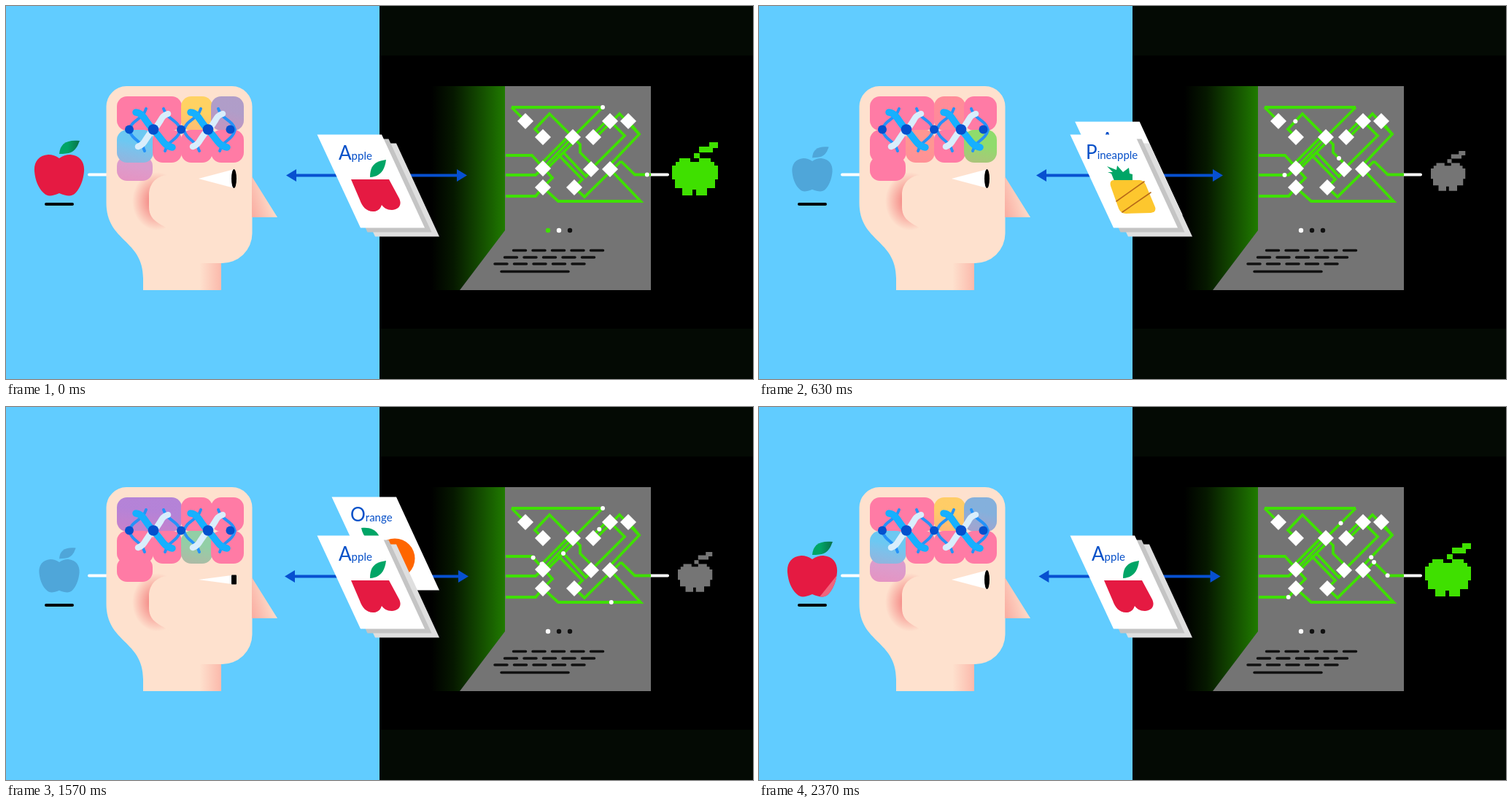
An HTML page that plays this animation: 1024x512 px, repeating every 2.41 s.

```html
<!DOCTYPE html>
<html lang="en">
<head>
<meta charset="utf-8">
<title>Human and machine vision</title>
<style>
html, body { margin: 0; height: 100%; overflow: hidden; background: #000; }
svg { display: block; width: 100vw; height: 100vh; }
text { font: 15px Lato, "Open Sans", sans-serif; fill: #0750c8; }
.cap { font-size: 26px; }
.line { fill: none; stroke-linecap: round; stroke-linejoin: round; }
</style>
</head>
<body>
<svg viewBox="0 0 1024 512" preserveAspectRatio="none">
<defs>
  <linearGradient id="glow"><stop stop-color="#000"/><stop offset=".3" stop-color="#061800"/><stop offset="1" stop-color="#207c00"/></linearGradient>
  <linearGradient id="neck"><stop offset=".1" stop-color="#fee1ce"/><stop offset="1" stop-color="#fbb9ab"/></linearGradient>
  <linearGradient id="nose" x1="0" y1=".8" x2=".8" y2=".4"><stop stop-color="#fab0a4"/><stop offset="1" stop-color="#fee1ce"/></linearGradient>
  <radialGradient id="ear"><stop offset=".3" stop-color="#f58f8a"/><stop offset="1" stop-color="#fee1ce"/></radialGradient>
  <linearGradient id="leaf"><stop offset=".4" stop-color="#00a566"/><stop offset="1" stop-color="#0a7049"/></linearGradient>
  <clipPath id="appleClip"><path id="appleShape" d="M73 209Q80 204 88 204C102 205 108 215 107 227C106 240 101 251 95 257C90 262 83 261 73 257C63 261 57 262 52 257C45 251 40 240 39 227C38 215 44 205 58 204Q66 204 73 209Z"/></clipPath>
</defs>

<path fill="#61ccff" d="M0 0H512V512H0Z"/>
<path fill="#040a04" d="M512 0H1024V512H512Z"/>
<path d="M512 68H1024V443H512Z"/>

<g id="apple"></g>
<path class="line" stroke="#000" stroke-width="4" d="M55 272H91"/>
<path class="line" stroke="#fff" stroke-width="4" d="M114 231.500H138"/>

<path fill="#fee1ce" d="M137.500 138A28 28 0 0 1 165 110H310A28 28 0 0 1 337.500 138V312A41 41 0 0 1 295 353V390H188V374C188 320 137.500 324 137.500 270Z"/>
<path fill="url(#neck)" d="M262 353H295V390H262Z"/>
<path fill="url(#nose)" d="M337 234L372 290H337Z"/>
<ellipse fill="url(#ear)" cx="207" cy="268" rx="34" ry="40"/>
<path fill="#fee1ce" d="M222 232H262V312H228C219 299 196 299 196 276V258A26 26 0 0 1 222 232Z"/>
<g id="brain"></g>
<g id="neurons"></g>
<g id="eye"></g>

<path fill="url(#glow)" d="M583 110H685V308L622 390H583Z"/>
<path fill="#747474" d="M684 110H884V390H622L684 308Z"/>
<g class="line" stroke="#111" stroke-width="3.500" stroke-dasharray="17 9.500">
  <path d="M695.500 335.500H819"/><path d="M683.500 345H807"/><path d="M670 354H794"/>
  <path stroke-dasharray="none" d="M679 364.500H771"/>
</g>
<path class="line" stroke="#fff" stroke-width="4" d="M884 231.500H907"/>
<g id="wires" fill="none" stroke="#3fe000" stroke-width="3.800"></g>
<g id="pulses" fill="#fff"></g>
<g id="diamonds" fill="#fff"></g>
<g id="dots"></g>
<path id="pixels" d="M964 187H976V195H969V201H950V193H964ZM943 202H951V209H943Z
  M923 209H938V214H950V209H966V214H971V219H976V238H972V250H961V260H946V252H941V260H927V250H917V238H913V219H918V214H923Z"/>

<g id="arrow"></g>
<g id="cards"></g>
</svg>

<script>
const $ = id => document.getElementById(id);
const LOOP = 2410, STEPS = 16;
const starts = [0, 170, 330, 470, 630, 800, 970, 1130, 1270, 1430, 1570, 1730, 1870, 2030, 2200, 2370];
const pink = '#ff7ba5';

// Brain blocks: x, y, width, height, glow colour, step of the peak, spread in steps.
const blocks = [
  [152, 124, 89, 47, '#a884e0', 8.5, 3.5],
  [240, 124, 43, 47, '#ffd262', 0.5, 4],
  [281, 124, 45, 47, '#84b0dc', 14, 3.5],
  [152, 206, 49, 34, '#dc9ccc', 15.5, 2.4],
  [152, 170, 50, 45, '#6cc8f2', 15.5, 2.4],
  [201, 170, 40, 45, '#ffd766', 6, 2.5],
  [240, 170, 43, 45, '#92cfa6', 10.5, 3],
  [281, 170, 45, 45, '#8fdc6c', 3.7, 2.3]
];

// Wires: path, steps one signal takes, then the steps when signals set off.
const wires = [
  ['M712 158L693 139', 1, 1],
  ['M693 139H818', 4, 6],
  ['M777 180L818 139', 2, 14],
  ['M685 205H721L749 236L736 249', 5, 1, 8],
  ['M685 232H726L736 223', 2.3, 2.5],
  ['M685 261H726L736 249', 3.2, 5.8, 12.7],
  ['M736 180L725 169L745 148L777 180', 5, 2.3],
  ['M777 180L787 190V201L804 218', 2.7, 2],
  ['M802 224L848 178L828 158', 5.5, 4.6],
  ['M801 180L823 158', 1.8, 9],
  ['M805 184L841 148L868 176', 1],
  ['M853 158L868 176L828 218', 3.5, 12.2],
  ['M738 227L785 180', 3.9, 4.4],
  ['M736 223L777 180', 3.5, 3.7],
  ['M731 219L772 178', 3.5, 9.7],
  ['M764 201L795 234L802 226', 2.5, 10],
  ['M757 204L790 238L779 249', 1],
  ['M779 249L793 262L843 213', 5, 10],
  ['M843 213L862 231.5H884', 2.8, 6, 13.5],
  ['M736 249L757 268H870L828 224', 5.8, 7.1]
];

const fruits = {
  Apple: `<text x="456" y="211"><tspan class="cap">A</tspan>pple</text>
    <path fill="#00a566" d="M499 235C499 219 506 213 521 211C519 227 512 234 499 235Z"/>
    <path fill="#e51a42" d="M473 238H525L539 264C544 275 536 280 529 280C522 280 518 277 515 273C513 280 508 282 503 282C494 282 488 275 485 266Z"/>`,
  Pineapple: `<text x="448" y="210"><tspan class="cap">P</tspan>ineapple</text>
    <path fill="#00a566" d="M477 220L490 225L491 219L499 228L507 222L508 230L512 231V240H487L483 230L478 228L485 228Z"/>
    <path fill="#fdc72e" d="M487 239H522Q527 239 530 245L543 276Q545 283 537 284L503 285Q496 285 493 278L482 247Q480 239 487 239Z"/>
    <path class="line" stroke="#b86a18" stroke-width="1.600" d="M490 268L528 241M498 283L537 256"/>`,
  Orange: `<text x="452" y="210"><tspan class="cap">O</tspan>range</text>
    <path fill="#00a566" d="M467 219C482 217 492 224 494 239C480 241 470 234 467 219Z"/>
    <circle fill="#ff6600" cx="513" cy="261" r="27.500"/>`
};
const names = Object.keys(fruits);

const clamp = v => Math.max(0, Math.min(1, v));
const mix = (a, b, k) => `color-mix(in srgb, ${a}, ${b} ${k * 100}%)`;
const disc = (x, y, r, fill) => `<circle cx="${x}" cy="${y}" r="${r}" ${fill ? `fill="${fill}"` : ''}/>`;
const card = (x, y, fill, inner = '') =>
  `<g transform="translate(${x} ${y})"><path fill="${fill}" d="M426.500 176.500H515L574 304.500H486Z"/>${inner}</g>`;
const scaleAt = (x, y, k) => `translate(${x} ${y}) scale(${k}) translate(${-x} ${-y})`;

function drawFixed() {
  const side = `<path d="M169 170C173 155 187 157 192 141M169 170C173 185 186 184 190 199"/>`;
  const cell = `<g class="line">
    <g stroke="#2592f8" stroke-width="4">${side}<g transform="matrix(-1 0 0 1 408 0)">${side}</g></g>
    <path stroke="#16b0ff" stroke-width="9.500" d="M178 146C189 147 190 158 202 170S216 192 228 194"/>
    <path stroke="#d9eefc" stroke-width="8.500" d="M222 148C211 151 214 159 202 170S192 189 181 193"/></g>`;
  $('neurons').innerHTML = cell + `<g transform="translate(75 0)">${cell}</g>` +
    [169, 202, 240, 277, 307.5].map((x, i) => disc(x, 169.5, i % 2 ? 7.3 : 6, '#0450cd')).join('');
  $('wires').innerHTML = wires.map(([d]) => `<path d="${d}"/>`).join('');
  $('diamonds').innerHTML = [[712, 158], [736, 180], [777, 180], [805, 180], [828, 158], [853, 158],
    [736, 223], [802, 224], [828, 224], [736, 249], [779, 249]]
    .map(([x, y]) => `<path d="M${x} ${y - 11}l11 11l-11 11l-11-11z"/>`).join('');
}

function drawOutputs(s) {
  const lit = s === 0 || s >= 12;
  const size = clamp(s < 8 ? 1.5 - s / 2 : s / 2 - 5);
  const shine = 73 + (s - 12) * 19;
  $('apple').setAttribute('transform', scaleAt(73, 230, .81 + .19 * size));
  $('apple').innerHTML = `<use href="#appleShape" fill="${lit ? '#e51a42' : '#4fa6d9'}"/>
    <path fill="${lit ? 'url(#leaf)' : '#4fa6d9'}" d="M73 203C74 189 83 183 101 185L98 192C93 201 87 203 73 203Z"/>` +
    (s >= 12 ? `<path clip-path="url(#appleClip)" fill="#f0647d" d="M${shine} 202h14l-48 60h-14z"/>` : '');
  $('pixels').setAttribute('transform', scaleAt(945, 235, .75 + .25 * size));
  $('pixels').setAttribute('fill', lit ? '#3fe000' : '#757575');
}

function drawHead(s) {
  $('brain').innerHTML = blocks.map(([x, y, w, h, colour, peak, spread], i) => {
    const gap = Math.abs(s - peak), away = Math.min(gap, STEPS - gap);
    const c = mix(pink, colour, clamp(1.5 * (1 - away / spread)));
    return `<linearGradient id="b${i}" x1=".6" y1="0" x2=".35" y2="1">
      <stop offset=".4" style="stop-color:${c}"/><stop offset="1" style="stop-color:${mix(c, pink, .25)}"/></linearGradient>
      <rect x="${x}" y="${y}" width="${w}" height="${h}" rx="14" fill="url(#b${i})"/>`;
  }).join('');

  const open = 13 * clamp(Math.abs(s - 12) / 3) ** 1.7;
  const lid = open > 8 ? open : 1;
  $('eye').innerHTML = open
    ? `<path fill="#fff" d="M264 237L313 ${237 - open}V${237 + open}Z"/>
       <rect x="309" y="${237 - open}" width="7" height="${2 * open}" rx="${Math.min(3.5, lid)}" ry="${lid}"/>`
    : '<path class="line" stroke="#f5bba9" stroke-width="1.500" d="M266 237H309"/>';
}

function drawMachine(s) {
  $('pulses').innerHTML = wires.flatMap(([, span, ...departures], i) => departures.map(from => {
    const path = $('wires').children[i];
    const k = (s - from + STEPS) % STEPS / span;
    if (k > 1) return '';
    const p = path.getPointAtLength(k * path.getTotalLength());
    return disc(p.x, p.y, 3);
  })).join('');
  const lead = (s < 4 ? s + 1 : s < 10 ? s - 4 : s - 10) % 5;
  $('dots').innerHTML = [0, 1, 2].map(i =>
    disc(743 + 15 * i, 308, 3.2, i === lead ? '#fff' : i === lead - 1 ? '#3fe000' : '#111')).join('');
}

function drawMiddle(s) {
  const half = 126 - 2 * Math.cos(s * Math.PI / 4), l = 508 - half, r = 508 + half;
  $('arrow').innerHTML = `<path fill="#0750d0" d="M${l} 232.500l14-8.500v6.500H${r - 14}v-6.500l14 8.500l-14 8.500v-6.500H${l + 14}v6.500z"/>`;

  // Every four steps the front card lifts off, then sinks behind the stack.
  const phase = (s + 2) % 4, turn = Math.floor((s + 2) / 4);
  const rising = phase === 3, resting = s === 0 || s > 12;
  const front = resting ? 0 : turn + rising;
  const back = names[(front + 2) % 3];
  const lift = rising ? .5 : 1 - phase / 3;
  const inner = `<g transform="translate(${back === 'Apple' ? 6 : 0} 0)">${fruits[back]}</g>`;
  const lifted = resting ? '' : card(20 * lift, -53 * lift, '#fff', inner);
  const stack = card(20, 12, '#dfdfdf') + card(9.5, 6, '#c4c4c4') + card(0, 0, '#fff', fruits[names[front % 3]]);
  $('cards').innerHTML = rising ? stack + lifted : lifted + stack;
}

let shown = -1;
function tick() {
  const t = performance.now() % LOOP;
  const s = starts.findLastIndex(v => v <= t);
  if (s !== shown) {
    shown = s;
    [drawOutputs, drawHead, drawMachine, drawMiddle].forEach(draw => draw(s));
  }
  requestAnimationFrame(tick);
}
drawFixed();
tick();
</script>
</body>
</html>
```
